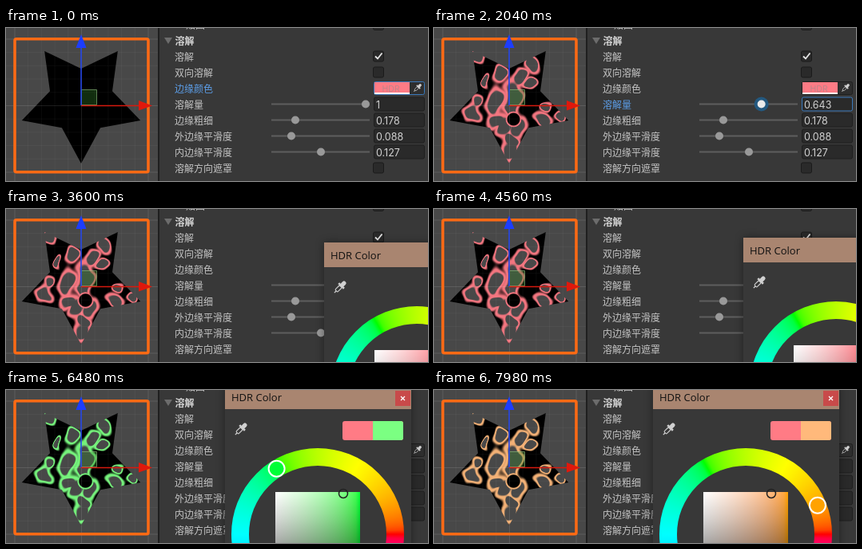
Animation of 528 by 192 pixels, one loop 8000 ms. Source, as an HTML page with a canvas:

```html
<!DOCTYPE html>
<html lang="zh">
<head>
<meta charset="utf-8">
<title>溶解</title>
<style>
html, body { margin: 0; width: 100%; height: 100%; overflow: hidden; background: #383838; }
canvas { display: block; }
</style>
</head>
<body>
<canvas id="stage" width="528" height="192"></canvas>
<script>
const LOOP = 8000, STEP = 60, PINK = -3;
const ctx = document.getElementById('stage').getContext('2d');
const CJK = '12px "Noto Sans CJK SC", "Noto Sans CJK", sans-serif';
const NUM = 'Inter, sans-serif';

// Keyframes: [time, value...], linear in between
const amountKeys = [[480, 1], [1140, .212], [1320, .02], [1380, 0], [1500, 0], [2340, 1], [2520, 1], [2700, .876], [2940, .66]];
const popupKeys = [[4500, 398, 42], [4560, 387, 36], [4620, 345, 18], [4680, 300, 0], [4740, 274, -7]];
const hueKeys = [[5520, PINK], [5580, -1], [6360, 110], [6480, 122], [6840, 160], [7020, 160], [7860, 32], [7980, 22]];

function at(keys, t, i = 1) {
  if (t <= keys[0][0]) return keys[0][i];
  for (let k = 1; k < keys.length; k++) {
    const a = keys[k - 1], b = keys[k];
    if (t <= b[0]) return a[i] + (b[i] - a[i]) * (t - a[0]) / (b[0] - a[0]);
  }
  return keys[keys.length - 1][i];
}

const clamp = v => Math.max(0, Math.min(1, v));
function smooth(a, b, v) {
  v = clamp((v - a) / (b - a));
  return v * v * (3 - 2 * v);
}

// The picker mixes in linear light, then shows the result gamma encoded
const gamma = v => v ** (1 / 2.2);
function pick(hue, sat = 1) {
  return [0, 8, 4].map(n => {
    const k = (n + hue / 30 + 12) % 12;
    const pure = .5 - .5 * Math.max(-1, Math.min(k - 3, 9 - k, 1));
    return 255 * gamma(1 - sat + sat * pure);
  });
}
const tint = hue => pick(hue, .8);
const css = c => `rgb(${c.map(Math.round)})`;

function addStops(gradient, count, color) {
  for (let i = 0; i <= count; i++) gradient.addColorStop(i / count, color(i / count));
  return gradient;
}

function box(x, y, w, h, fill, line, r = 2) {
  ctx.beginPath();
  ctx.roundRect(x, y, w, h, r);
  if (fill) { ctx.fillStyle = fill; ctx.fill(); }
  if (line) { ctx.strokeStyle = line; ctx.lineWidth = 1; ctx.stroke(); }
}
function disc(x, y, r, fill, line, width = 1) {
  ctx.beginPath();
  ctx.arc(x, y, r, 0, 7);
  if (fill) { ctx.fillStyle = fill; ctx.fill(); }
  if (line) { ctx.strokeStyle = line; ctx.lineWidth = width; ctx.stroke(); }
}
function poly(points, fill) {
  ctx.beginPath();
  points.forEach(p => ctx.lineTo(...p));
  ctx.closePath();
  ctx.fillStyle = fill;
  ctx.fill();
}
function path(points, line, width) {
  ctx.beginPath();
  points.forEach(p => ctx.lineTo(...p));
  ctx.strokeStyle = line;
  ctx.lineWidth = width;
  ctx.stroke();
}
function text(s, x, y, color, font) {
  ctx.font = font;
  ctx.fillStyle = color;
  ctx.fillText(s, x, y);
}

// ---- dissolving star ----
const SIZE = 160, LEFT = 14, TOP = 20;
const layer = document.createElement('canvas');
layer.width = layer.height = SIZE;
const starCtx = layer.getContext('2d');
const pixels = starCtx.createImageData(SIZE, SIZE);

// Spots where the dissolve begins: x, y, radii
const spots = [
  [53, 36, 5, 4], [64, 64, 2, 4], [82, 58, 4, 5], [107, 60, 4, 5], [123, 47, 4, 5],
  [122, 70, 4, 3], [76, 92, 5, 8], [99, 84, 5, 9], [97, 101, 4, 5], [140, 97, 3, 3],
  [76, 117, 5, 4], [87, 125, 4, 6], [104, 122, 5, 6], [135, 114, 5, 4], [157, 112, 3, 3],
  [47, 108, 5, 5], [53, 92, 3, 4], [94, 155, 5, 6], [97, 140, 4, 4]
];
const noise = new Float32Array(SIZE * SIZE);
for (let i = 0; i < noise.length; i++) {
  const px = LEFT + i % SIZE, py = TOP + Math.floor(i / SIZE);
  const x = px + 2 * Math.sin(py / 5) + Math.sin((px + py) / 4);
  const y = py + 2 * Math.sin(px / 6) + Math.sin((px - py) / 4);
  let sum = 1e-9;
  for (const [sx, sy, rx, ry] of spots) {
    const d = ((x - sx) / rx) ** 2 + ((y - sy) / ry) ** 2;
    sum += 1 / (d + .01) ** 3;
  }
  const v2 = sum ** (-1 / 3);
  const peak = .72 * Math.exp(-((px - 99) ** 2 + (py - 114) ** 2) / 90);
  noise[i] = Math.max(Math.min(.05 + .85 * v2 / (v2 + 10), .62), peak);
}

function star(amount, color) {
  const outer = 1 - amount, inner = outer - .11;
  for (let i = 0; i < noise.length; i++) {
    const glow = 1 - smooth(outer - .05, outer + .05, noise[i]);
    for (let c = 0; c < 3; c++) pixels.data[i * 4 + c] = color[c] * glow * .95;
    pixels.data[i * 4 + 3] = 255 * smooth(inner - .03, inner + .03, noise[i]);
  }
  starCtx.putImageData(pixels, 0, 0);
  starCtx.globalCompositeOperation = 'destination-in';
  starCtx.filter = 'blur(.7px)';
  starCtx.beginPath();
  for (let k = 0; k < 10; k++) {
    const a = Math.PI * (.5 + k / 5), r = k % 2 ? 41 : 78;
    starCtx.lineTo(94 - LEFT + r * Math.cos(a), 92 - TOP + r * Math.sin(a));
  }
  starCtx.closePath();
  starCtx.fill();
  starCtx.filter = 'none';
  starCtx.globalCompositeOperation = 'source-over';
  ctx.drawImage(layer, LEFT, TOP);
}

function grid() {
  for (let k = -6; k <= 6; k++) {
    const d = k * 16.7, color = `rgba(255,255,255,${k % 5 ? .04 : .11})`;
    path([[94.5 + d, 0], [94.5 + d, 192]], color, 1);
    path([[0, 97.5 + d], [190, 97.5 + d]], color, 1);
  }
}

function scene(amount, color) {
  ctx.save();
  ctx.beginPath();
  ctx.rect(0, 0, 190, 192);
  ctx.clip();
  ctx.fillStyle = '#484848';
  ctx.fillRect(0, 0, 190, 192);
  star(amount, color);
  grid();
  ctx.strokeStyle = '#ff6a14';
  ctx.lineWidth = 3.5;
  ctx.beginPath();
  ctx.roundRect(11, 13.7, 167, 167, 2);
  ctx.stroke();
  box(94.5, 77.5, 19, 19, 'rgba(50,130,40,.35)', 'rgba(140,190,125,.65)', 0);
  path([[94, 97], [94, 25]], '#2344e8', 1.6);
  poly([[87.5, 25], [94, 8], [100.5, 25]], '#1d3dff');
  path([[94, 97.5], [167, 97.5]], '#d8190e', 1.6);
  poly([[166, 91], [183, 97.5], [166, 103.5]], '#e0180c');
  ctx.restore();
}

// ---- inspector ----
function dropper(x, y, s) {
  ctx.save();
  ctx.translate(x, y);
  ctx.rotate(Math.PI / 4);
  ctx.scale(s, s);
  box(-2.3, -8.5, 4.6, 6.5, '#d0d0d0', null, 2);
  box(-4.2, -3.2, 8.4, 2.4, '#d0d0d0', null, 0);
  box(-1.9, -1, 3.8, 7, null, '#d0d0d0', 1);
  box(-.6, 6, 1.2, 3, '#d0d0d0', null, 0);
  ctx.restore();
}

function check(y, on) {
  box(459.5, y - 6.5, 13, 13, '#2a2a2a', '#1b1b1b');
  if (on) path([[462, y], [465, y + 3], [470.5, y - 4]], '#e6e6e6', 1.8);
}

function slider(y, value, x, state) {
  ctx.fillStyle = '#5e5e5e';
  ctx.fillRect(332, y - 1, 123, 2);
  if (state === 'focus') disc(x, y, 9, '#23587f');
  disc(x, y, 5, state === 'focus' ? '#eaeaea' : state === 'hover' ? '#c8c8c8' : '#999');
  box(460.5, y - 8.5, 63, 17, '#2a2a2a', state === 'focus' ? '#3a79bb' : state === 'hover' ? '#656565' : '#1e1e1e');
  text(value, 463, y + 5, '#d2d2d2', '12.5px ' + NUM);
}

function inspector(t, amount, color) {
  ctx.fillStyle = '#383838';
  ctx.fillRect(190, 0, 338, 192);
  ctx.fillStyle = '#1f1f1f';
  ctx.fillRect(190, 0, 2, 192);

  const active = t < 540 ? 2 : t < 3600 ? 3 : -1;
  text('贴图', 225, 1, '#c4c4c4', CJK);
  check(-4, false);
  poly([[198, 12], [208, 12], [203, 20]], '#6c6c6c');
  text('溶解', 211.5, 20.5, '#d6d6d6', 'bold ' + CJK);
  ['溶解', '双向溶解', '边缘颜色', '溶解量', '边缘粗细', '外边缘平滑度', '内边缘平滑度', '溶解方向遮罩'].forEach((s, i) =>
    text(s, 211, 40.5 + i * 20, i === active ? '#5c9ee8' : '#c4c4c4', CJK));

  check(35.5, true);
  check(55.5, false);
  check(175.5, false);

  box(460.5, 67.5, 63, 16, '#2e2e2e', active === 2 || t >= 3300 && t < 3600 ? '#3a79bb' : '#1e1e1e');
  ctx.fillStyle = css(color);
  ctx.fillRect(461, 68, 44, 13);
  ctx.fillStyle = '#fff';
  ctx.fillRect(461, 81, 44, 2);
  text('HDR', 470.5, 79.5, '#bd858a', '10.5px ' + NUM);
  dropper(515, 75, .72);

  const state = active === 3 ? 'focus' : t >= 60 && t < 540 ? 'hover' : '';
  slider(95.5, String(+amount.toFixed(3)), 337 + 113 * amount, state);
  slider(115.5, '0.178', 362);
  slider(135.5, '0.088', 357);
  slider(155.5, '0.127', 394);
}

// ---- colour window ----
function popup(x, y, hue) {
  ctx.save();
  ctx.translate(x, y);
  ctx.shadowColor = 'rgba(0,0,0,.4)';
  ctx.shadowBlur = 10;
  box(0, 0, 233, 260, '#383838', null, 0);
  ctx.shadowColor = 'transparent';
  box(0, 0, 233, 31, '#a98570', null, 0);
  text('HDR Color', 8, 20.5, '#111', '13px "Open Sans", sans-serif');
  box(213, 8, 19, 19, '#c84a4a', null, 0);
  path([[220, 15], [225, 20]], '#fff', 1.3);
  path([[225, 15], [220, 20]], '#fff', 1.3);
  dropper(20, 56, 1.12);

  box(147, 46, 76, 24, css(tint(PINK)), null, 3);
  box(185, 46, 38, 24, css(tint(hue)), null, [0, 3, 3, 0]);

  const cx = 116, cy = 188, side = 106, sx = cx - 53, sy = cy - 53;
  const wheel = addStops(ctx.createConicGradient(0, cx, cy), 120, f => css(pick(360 - f * 360)));
  disc(cx, cy, 97, null, wheel, 22);

  const across = addStops(ctx.createLinearGradient(sx, 0, sx + side, 0), 20, f => css(pick(hue, f)));
  const down = addStops(ctx.createLinearGradient(0, sy, 0, sy + side), 20, f => `rgba(0,0,0,${1 - gamma(1 - f)})`);
  for (const fill of [across, down]) box(sx, sy, side, side, fill, null, 0);
  disc(148, 137, 5.5, null, '#222', 1.5);

  const a = hue * Math.PI / 180;
  disc(cx + 97 * Math.cos(a), cy - 97 * Math.sin(a), 10, css(pick(hue)), '#fff', 2);
  ctx.restore();
}

function draw(now) {
  const t = Math.floor(now % LOOP / STEP) * STEP;
  const amount = at(amountKeys, t), hue = at(hueKeys, t), color = tint(hue);
  scene(amount, color);
  inspector(t, amount, color);
  if (t >= 3600) popup(at(popupKeys, t), at(popupKeys, t, 2), hue);
  requestAnimationFrame(draw);
}
requestAnimationFrame(draw);
</script>
</body>
</html>
```
